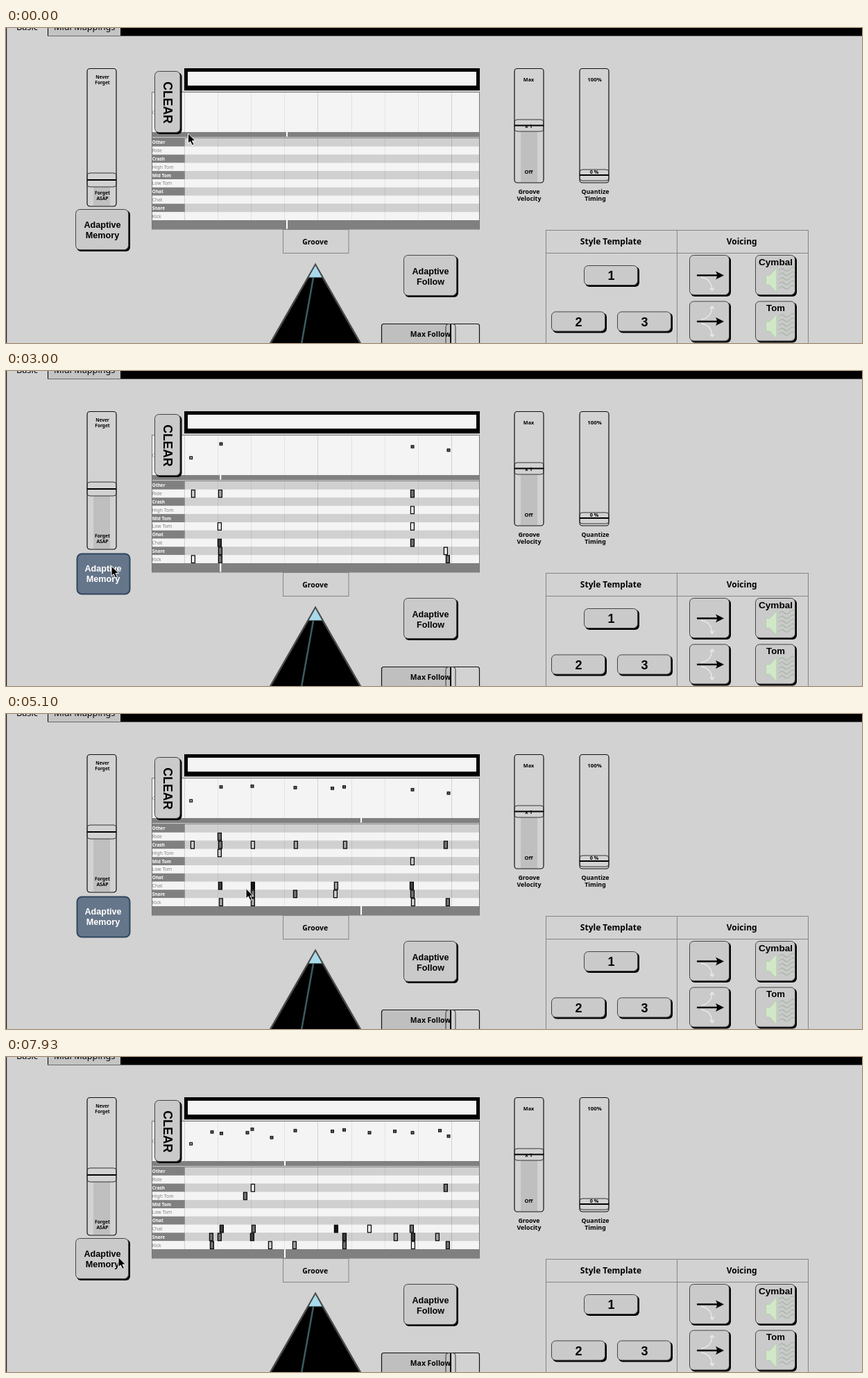
An HTML page that plays this animation: 1234 px wide and 454 px high, repeating every 8000 ms.

```html
<!DOCTYPE html>
<html lang="en">
<head>
<meta charset="utf-8">
<title>Adaptive drum pattern</title>
<style>
html, body { margin: 0; width: 1234px; height: 454px; overflow: hidden; background: #d2d2d2; }
svg { display: block; }
text { font-family: "Noto Sans", "Open Sans", sans-serif; }
.b { font-weight: 700; }
.h { font-family: "Liberation Sans", Arial, sans-serif; font-weight: 700; }
</style>
</head>
<body>
<svg id="stage" width="1234" height="454" viewBox="0 0 1234 454"></svg>
<script>
const LOOP = 8000, LEFT = 257.5, BAR = 385.6, ROW = 11.8, TOP = 159;
const ROWS = ['Other', 'Ride', 'Crash', 'High Tom', 'Mid Tom', 'Low Tom', 'Ohat', 'Chat', 'Snare', 'Kick'];
const SHADES = { w: '#f2f2f2', l: '#cbcbcb', m: '#a0a0a0', d: '#707070', k: '#3c3c3c', b: '#141414' };

// Playhead position counted on without wrapping: time, x
const HEAD = [[0, 405], [2250, 622], [3450, 738.6], [5100, 897.6], [6140, 995.6], [7040, 1085.2], [7930, 1173.2]];
const POINTER = [[0, 262.5, 152], [2250, 262.5, 152], [2850, 152, 281], [3600, 152, 281], [4200, 300, 258],
  [4650, 346, 251.5], [5250, 346, 251.5], [6140, 217.5, 288], [6440, 162, 288.5]];
const PRESS = 3000, RELEASE = 6740;

// Velocity dots: bar, x, y
const DOTS = [[0, 586, 109], [0, 638, 114], [1, 266.7, 125], [1, 310, 105], [1, 355, 104], [1, 417, 106],
  [1, 470.5, 107], [1, 487.5, 105], [1, 524, 109], [1, 560.5, 107], [1, 625.5, 106],
  [2, 297, 108], [2, 310.5, 110], [2, 348, 109], [2, 383, 116]];

// Generated patterns: notes per row as x plus shade
const PATTERNS = [
  { at: 0, rows: {} },
  { at: 1950, rows: { Ride: '586d', 'High Tom': '586w', 'Low Tom': '586w', Chat: '586d' } },
  { at: 3450, rows: { Ride: '270l 309m', 'High Tom': '585w', 'Mid Tom': '585m', 'Low Tom': '308w',
    Chat: '308k 585k', Snare: '309d 356d 634w', Kick: '270w 309d 637d' } },
  { at: 4950, rows: { Ride: '308d', Crash: '269l 309d 356l 418m 489m 634d', 'High Tom': '308l', 'Mid Tom': '586l',
    Chat: '309k 356b 476m 585k', Snare: '356d 417d 475l 586d', Kick: '310m 356m 587l 637d' } },
  { at: 6000, rows: { Crash: '270l 308d 356l 417m 474l 489l 525l 562m 586l 634d',
    Chat: '309k 356k 418w 476k 489l 586k', Snare: '309k 356l 417l', Kick: '309l 356m 417m 524k 587l 636d' } },
  { at: 7040, rows: { Crash: '418l 562m 625k', 'Mid Tom': '586d', Chat: '309k 356k 476b 489m 524l 586m',
    Snare: '297d 356d 525m 587k 622l', Kick: '297d 417l 561l 636d' } },
  { at: 7780, rows: { Crash: '356w 634d', 'High Tom': '345d', Chat: '311k 357d 476b 524w 585d',
    Snare: '296d 308d 355k 488k 562m 587k 622m', Kick: '297d 381l 416m 488d 587w 637d' } }
];
for (const p of PATTERNS)
  p.notes = Object.entries(p.rows).flatMap(([name, list]) => list.split(' ').map(n =>
    ({ x: parseInt(n), y: TOP + (ROWS.indexOf(name) + 0.5) * ROW, shade: SHADES[n.slice(-1)] })));

const TICKS = [];
for (let t = 0; t < LOOP; t += t === 6000 || t === 7490 ? 140 : 150) TICKS.push(t);

const rect = (x, y, w, h, fill, more = '') =>
  `<rect x="${x}" y="${y}" width="${w}" height="${h}" fill="${fill}" ${more}/>`;
const path = (d, more) => `<path d="${d}" ${more}/>`;
const text = (s, x, y, size, more = 'class="b" text-anchor="middle"') =>
  `<text x="${x}" y="${y}" font-size="${size}" ${more}>${s}</text>`;
const head = (s, x, y, size, more = '') => text(s, x, y, size, `class="h" text-anchor="middle" ${more}`);
const button = (x, y, w, h) =>
  rect(x + 2, y + 2, w, h, '#000', 'rx="6"') +
  rect(x + 0.5, y + 0.5, w - 1, h - 1, '#cacaca', 'rx="6" stroke="#444"');
const pair = (a, b, x, y, size, gap, more) => text(a, x, y, size, more) + text(b, x, y + gap, size, more);

const slot = (x, bottom) => rect(x, 58.5, 42, bottom - 58.5, 'none', 'rx="4" stroke="#111" stroke-width="1.2"');
const thumb = (x, mid, half) =>
  rect(x, mid - half, 42, half * 2, 'none', 'rx="4" stroke="#333"') +
  path(`M${x} ${mid}h42`, 'stroke="#000" stroke-width="2"');

function chart() {
  let s = rect(257, 58, 426, 32, '#000') + rect(262, 63, 416, 20, '#f4f4f4') +
    rect(210.5, 92.5, 472, 58, '#f4f4f4', 'stroke="#777"') +
    rect(210, 150, 473, 7, '#808080') + rect(210, 157, 473, 2, '#c8c8c8') +
    path('M210 158.5H683', 'stroke="#888"');
  ROWS.forEach((name, i) => {
    const y = TOP + i * ROW, dark = i % 2 === 0;
    s += rect(210, y, 473, ROW, dark ? '#d0d0d0' : '#f4f4f4');
    if (dark) s += rect(210, y, 47.5, ROW, '#808080');
    s += text(name, 210.8, y + 8.4, dark ? 6.4 : 6.8, dark ? 'class="b" fill="#fff"' : 'fill="#808080"');
  });
  for (let i = 0; i <= 8; i++) {
    const x = Math.round(LEFT + i * BAR / 8) - 0.5;
    s += path(`M${x} 93V150M${x} 159V277`, `stroke="#000" stroke-opacity="${i % 4 ? 0.07 : 0.14}"`);
  }
  return s + rect(210, 277, 473, 13.5, '#808080') +
    path('M210.5 92V290M682.5 92V290', 'stroke="#777"') +
    text('C', 210.8, 124, 6.8, 'fill="#888"');
}

function voice(y, label, size, up) {
  const arc = dir => path(`M1002 ${y + dir * 3}Q1017 ${y + dir * 5} 1018 ${y + dir * 21}m-3 ${-dir * 3}l3 ${dir * 4}l3 ${-dir * 4}`,
    'fill="none" stroke="#ececec" stroke-width="1.3"');
  let s = button(985, y - 29.5, 58, 58) + button(1080, y - 29.5, 58, 58) + arc(1) + (up ? arc(-1) : '') +
    path(`M996 ${y}h32`, 'stroke="#000" stroke-width="2.4"') +
    path(`M1035 ${y}l-12 -6q4 6 0 12z`, 'fill="#000"') +
    path(`M1095.5 ${y}h5.5l10 -11v36l-10 -11h-5.5z`, 'fill="#d0e8c8" stroke="#b4ccae"');
  for (let i = 0; i < 5; i++)
    s += path(`M1114 ${y - 7 + i * 6.5}q4 -5 8 -1t8 -1t6 -1`, 'fill="none" stroke="#a3b5a3" stroke-width="1.2"');
  return s + head(label, 1109.5, y - 15, size);
}

function scene() {
  const line = 'stroke="#858585"';
  let s = rect(0, 0, 1234, 454, '#d2d2d2') + rect(60, 0, 1174, 11.5, '#000') + rect(61, 0, 104, 11, '#c4c4c4') +
    rect(0, 0, 1.2, 454, '#222') +
    text('Basic', 15, 3, 12.7, '') + text('Midi Mappings', 69, 3, 12.7, '') + chart();
  s += button(214, 62, 37.5, 89) + head('CLEAR', 0, 0, 17.6, 'transform="translate(227 107.5) rotate(90)"');

  s += rect(742, 149, 24, 73, '#bfbfbf') + slot(733, 223) + slot(827, 223) +
    text('Max', 753.5, 77, 7.2) + text('Off', 753.5, 210, 7.5) + text('x 1', 753.5, 143.5, 7.5) +
    text('100%', 848.5, 77, 7.8) + text('0 %', 848, 210, 7.2) +
    thumb(733, 140.5, 8.5) + thumb(827, 212, 8) +
    pair('Groove', 'Velocity', 754, 239, 8.8, 10) + pair('Quantize', 'Timing', 849.5, 239, 8.8, 10);

  s += rect(399.5, 290.5, 94.5, 34, 'none', line) + text('Groove', 445.7, 311.5, 10.4) +
    path('M446 341L371 472H521z', 'fill="#000" stroke="#4a4a4a" stroke-width="2.5"') +
    path('M446 342.5L436.5 359.5H455.5z', 'fill="#a9daec"') +
    path('M443 360L426 455', 'stroke="#3c5a5e" stroke-width="2.6"');

  s += button(573, 327, 77, 59) + pair('Adaptive', 'Follow', 612, 354.5, 12.6, 15, 'class="h" text-anchor="middle"') +
    rect(541, 427, 100, 33, '#bfbfbf', 'rx="3"') +
    rect(541.5, 426.5, 141, 40, 'none', 'rx="3" stroke="#111" stroke-width="1.2"') +
    text('Max Follow', 612, 444.8, 10.4) +
    rect(634, 426.5, 14, 40, 'none', 'rx="4" stroke="#333"') +
    path('M641 427V455', 'stroke="#000" stroke-width="2"');

  s += rect(778.5, 291.5, 378, 180, 'none', line) + path('M967.5 292V454M779 324.5H1157', line) +
    text('Style Template', 872, 312, 12) + text('Voicing', 1060.7, 312, 12);
  for (const [n, x, y] of [[1, 833, 342], [2, 786, 408.5], [3, 881, 408.5]])
    s += button(x, y, 78, 29) + head(n, x + 39.5, y + 21, 18);
  return s + voice(356.5, 'Cymbal', 13.6, false) + voice(423, 'Tom', 13.2, true);
}

function sample(keys, t) {
  const i = keys.findIndex(k => k[0] > t);
  if (i < 0) return keys[keys.length - 1].slice(1);
  const a = keys[i - 1], b = keys[i], f = (t - a[0]) / (b[0] - a[0]);
  return a.slice(1).map((v, j) => v + (b[j + 1] - v) * f);
}
const headAt = t => sample(HEAD, t)[0];

function memory(t) {
  const mid = t < PRESS ? 219 : 170, down = t >= PRESS && t < RELEASE;
  const shift = down ? 1 : 0;
  return rect(126, mid + 10, 24, 246 - mid, '#bfbfbf') + slot(117, 257) + thumb(117, mid, 10) +
    pair('Never', 'Forget', 139, 73, 6.5, 8) + pair('Forget', 'ASAP', 139, 239.5, 6.7, 8) +
    (down ? rect(102.5, 263.5, 76, 58, '#66768a', 'rx="7" stroke="#2f4760" stroke-width="2"') : button(100, 261, 77, 59)) +
    pair('Adaptive', 'Memory', 139 + shift, 287.7 + shift, 12.6, 15,
      `class="h" text-anchor="middle" fill="${down ? '#fff' : '#000'}"`);
}

// Columns swept since a pattern began already show the next one.
function notes(t, now) {
  const i = PATTERNS.findLastIndex(p => p.at <= t), next = PATTERNS[i + 1];
  const start = headAt(PATTERNS[i].at);
  const swept = n => next && (((n.x - start) % BAR) + BAR) % BAR < now - start + 2.5;
  const shown = PATTERNS[i].notes.filter(n => !swept(n));
  if (next) shown.push(...next.notes.filter(swept));
  return shown.map(n => rect(n.x - 2.6, n.y - 5.2, 5, 10.6, n.shade, 'stroke="#000" stroke-width="1.2"')).join('');
}

function dots(now) {
  const shown = DOTS.filter(([bar, x]) => x + bar * BAR <= now + 2.5);
  return shown.filter((d, i) => !shown.some((e, j) => j > i && Math.abs(e[1] - d[1]) < 1))
    .map(([, x, y]) => rect(x - 1.9, y - 1.7, 3.8, 3.6, y > 120 ? '#aaa' : '#666', 'stroke="#000" stroke-width="1.1"')).join('');
}

function moving(t) {
  const now = headAt(t), x = LEFT + (now - LEFT) % BAR, [px, py] = sample(POINTER, t);
  return memory(t) + dots(now) + notes(t, now) +
    rect(x - 1, 150, 2, 6.5, '#fff') + rect(x - 1, 277, 2, 12.5, '#fff') +
    path(`M${px} ${py}v14.5l3.2 -3l2.7 5.6l2.6 -1.2l-2.6 -5.3h4.6z`, 'fill="#000" stroke="#fff" stroke-width="1"');
}

const stage = document.getElementById('stage');
stage.innerHTML = `<g>${scene()}</g><g id="live"></g>`;
const live = document.getElementById('live');
let last = -1;
const origin = performance.now();
function draw() {
  const t = (performance.now() - origin) % LOOP;
  const tick = TICKS.findLast(k => k <= t);
  if (tick !== last) {
    last = tick;
    live.innerHTML = moving(tick);
  }
  requestAnimationFrame(draw);
}
draw();
</script>
</body>
</html>
```
